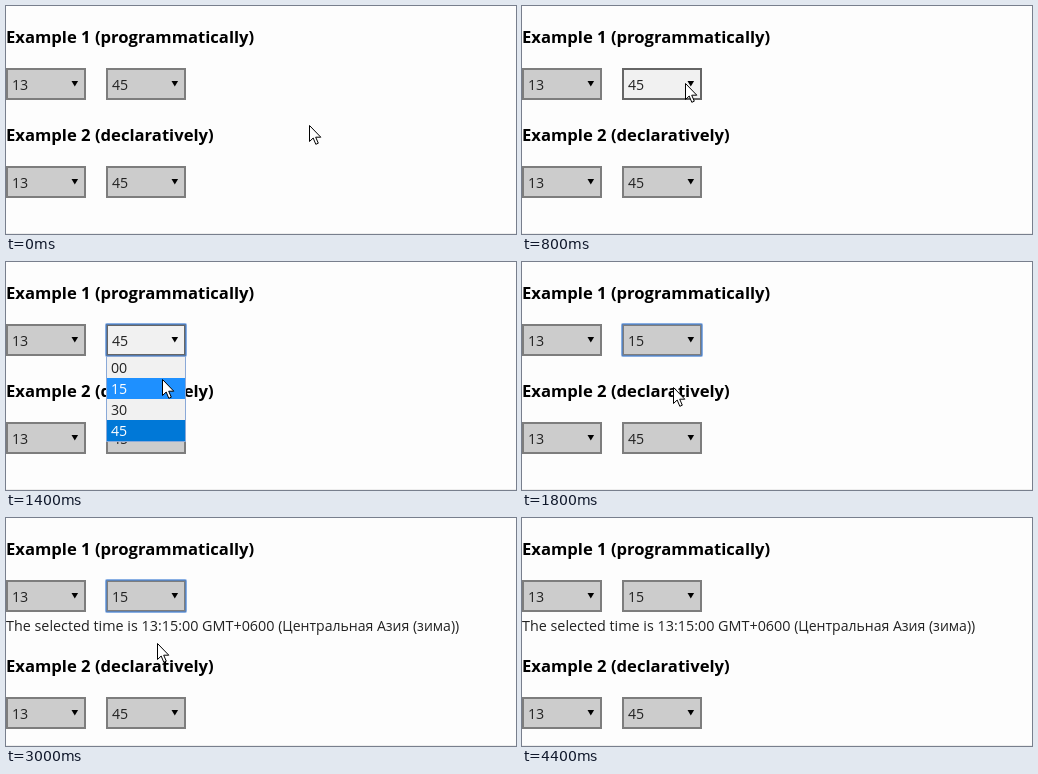
Write an HTML page that moves like this. It is 510 px wide and 228 px high and loops after 4500 ms.

```html
<!DOCTYPE html>
<html lang="en">
<head>
<meta charset="utf-8">
<title>Time picker demo</title>
<style>
  html, body { margin: 0; width: 100%; height: 100%; overflow: hidden; background: #fdfdfd; }
  svg { display: block; width: 510px; height: 228px; }
  text { font: 14.2px "Open Sans", "Noto Sans", sans-serif; fill: #222; white-space: pre; }
  .title { font-size: 16.65px; font-weight: 700; fill: #000; }
  #message { font-size: 14.35px; }
  #message tspan { font-size: 14.05px; }
  .box { fill: #ccc; stroke: #7d7d7d; stroke-width: 2; }
  .box.lit { fill: #f1f1f1; stroke: #666; }
  #ring { fill: none; stroke: #4a86d8; stroke-width: 2; stroke-opacity: .65; }
  .light { fill: #fff; }
</style>
</head>
<body>
<svg viewBox="0 0 510 228">
  <rect width="510" height="228" fill="#fdfdfd"/>
  <rect y="227" width="510" height="1" fill="#ededed"/>
  <text class="title" x="0" y="37">Example 1 (programmatically)</text>
  <g id="first"></g>
  <rect id="ring" x="100" y="62" width="80" height="32" rx="1"/>
  <text id="message" x="0" y="112.5">The selected time is 13:15:00 GMT+0600 <tspan>(Центральная Азия (зима))</tspan></text>
  <g id="second"><text class="title" x="0" y="135">Example 2 (declaratively)</text></g>
  <g id="list"><rect x="100.5" y="94.5" width="79" height="85" fill="#f1f1f1" stroke="#8aa9d8"/></g>
  <path id="cursor" d="M.5 .5V16.5L4.2 13L6.8 19.3L9.3 18.2L6.7 12.2H11.8Z" fill="#fff" stroke="#000"/>
</svg>
<script>
const LOOP = 4500, STEP = 100, ROW = 21;
const OPEN = 1000, CLOSE = 1800, RESULT = 1900, LEAVE = 3900, BLUR = 4400;
const VALUES = ["00", "15", "30", "45"];

const linear = k => k;
const smooth = k => k * k * (3 - 2 * k);
const easeOut = power => k => 1 - (1 - k) ** power;

// Pointer trips: to the select, down to an option, off the stage
const START = { x: 303, y: 119 };
const TRIPS = [
  { from: 100, to: 700, x: 163, y: 77, easeX: smooth, easeY: smooth },
  { from: 1000, to: 1680, x: 151, y: 125, easeX: linear, easeY: easeOut(2) },
  { from: 3000, to: LEAVE, x: 270, y: 222, easeX: easeOut(3), easeY: linear }
];

const $ = id => document.getElementById(id);

function add(parent, tag, attrs, content = "") {
  const node = document.createElementNS("http://www.w3.org/2000/svg", tag);
  for (const key in attrs) node.setAttribute(key, attrs[key]);
  node.textContent = content;
  return parent.appendChild(node);
}

function addSelect(parent, x, y, value) {
  const box = add(parent, "rect", { class: "box", x: x + 1, y: y + 1, width: 78, height: 30 });
  const label = add(parent, "text", { x: x + 6, y: y + 22 }, value);
  add(parent, "path", { d: `M${x + 65.5} ${y + 13}h6.6l-3.3 5.6z` });
  return { box, label };
}

addSelect($("first"), 0, 62, "13");
const minutes = addSelect($("first"), 100, 62, "45");
addSelect($("second"), 0, 160, "13");
addSelect($("second"), 100, 160, "45");

const rows = VALUES.map((value, i) => {
  const y = 95 + i * ROW;
  const fill = add($("list"), "rect", { x: 101, y, width: 78, height: ROW });
  const label = add($("list"), "text", { x: 105, y: y + 16 }, value);
  return { fill, label, y };
});

function pointer(t) {
  let { x, y } = START;
  for (const trip of TRIPS) {
    const k = Math.min(1, Math.max(0, (t - trip.from) / (trip.to - trip.from)));
    x += (trip.x - x) * trip.easeX(k);
    y += (trip.y - y) * trip.easeY(k);
  }
  return { x: Math.round(x), y: Math.round(y) };
}

function show(node, on) {
  node.setAttribute("visibility", on ? "visible" : "hidden");
}

function draw(t) {
  const { x, y } = pointer(t);
  const open = t >= OPEN && t < CLOSE;
  const done = t >= RESULT;
  const hover = x >= 100 && x < 180 && y >= 62 && y < 94;

  $("cursor").setAttribute("transform", `translate(${x} ${y})`);
  show($("cursor"), t < LEAVE);
  show($("list"), open);
  show($("ring"), t >= OPEN && t < BLUR);
  show($("message"), done);
  $("second").setAttribute("transform", `translate(0 ${done ? 19 : 0})`);
  minutes.box.setAttribute("class", hover || open ? "box lit" : "box");
  minutes.label.textContent = t >= CLOSE ? "15" : "45";

  rows.forEach((row, i) => {
    const over = y >= row.y && y < row.y + ROW;
    const chosen = VALUES[i] === "45";
    row.fill.setAttribute("fill", chosen ? "#0078d7" : over ? "#1e90ff" : "none");
    row.label.setAttribute("class", chosen || over ? "light" : "");
  });
}

const start = performance.now();
function tick() {
  const t = (performance.now() - start) % LOOP;
  draw(Math.floor(t / STEP) * STEP);
  requestAnimationFrame(tick);
}
tick();
</script>
</body>
</html>
```
